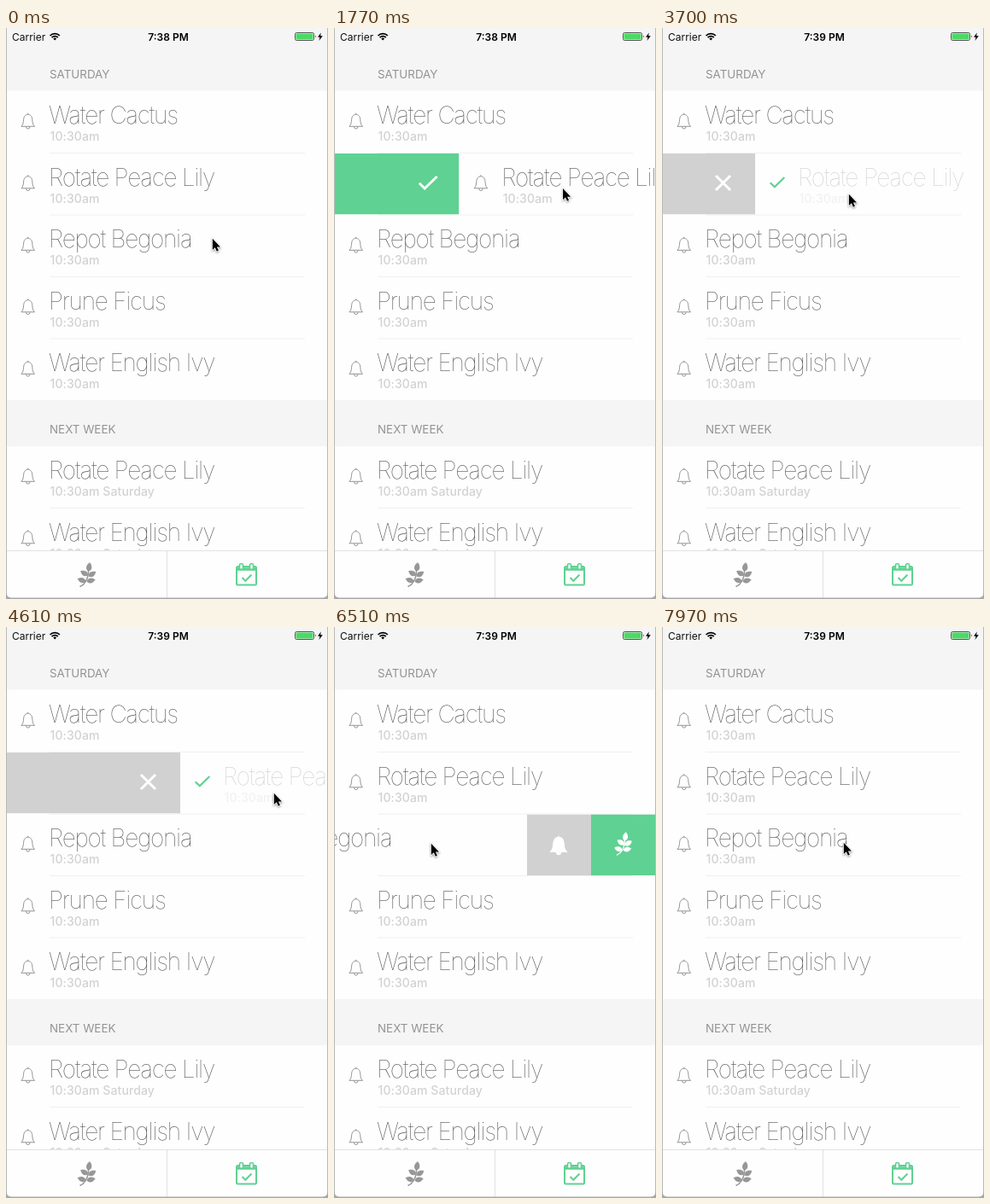
Write an HTML page that moves like this. It is 377 px wide and 669 px high and loops after 7990 ms.

```html
<!DOCTYPE html>
<html lang="en">
<head>
<meta charset="utf-8">
<title>Plant care reminders</title>
<style>
  html, body { margin: 0; width: 100%; height: 100%; overflow: hidden; background: #fefefe; }
  svg { display: block; width: 100%; height: 100%; }
  text { font-family: Inter, Roboto, sans-serif; font-optical-sizing: none; }
  .title { font-size: 28px; font-weight: 100; letter-spacing: -1.25px; fill: #555; }
  .time { font-size: 14px; font-weight: 500; letter-spacing: .1px; fill: #d2d2d2; }
  .section { font-size: 13.4px; fill: #939396; }
  .status { font-size: 12px; fill: #111; }
  .clock { font-weight: 600; text-anchor: middle; fill: #000; }
  .line { fill: none; }
</style>
</head>
<body>
<svg viewBox="0 0 377 669">
  <defs>
    <g id="bell">
      <path d="M-7.8 6C-5.4 4-5.4 1-5.1-2C-4.8-6-2.6-8-0-8S4.8-6 5.1-2C5.4 1 5.4 4 7.8 6Z"/>
      <path d="M-2.2 6.4a2.2 2.4 0 0 0 4.4 0M0-8V-9.6"/>
    </g>
    <path id="check" d="M-8.3 .2L-3.2 5.2L8.3-6"/>
    <path id="leaf" d="M0 0C-5-3-5-8 0-13C5-8 5-3 0 0Z"/>
    <g id="plant">
      <path d="M-8 14C-3 12 2 6 2-5" fill="none" stroke="currentColor" stroke-width="1.5"/>
      <g fill="currentColor">
        <use href="#leaf" transform="translate(2 -3.5) rotate(8) scale(.85)"/>
        <use href="#leaf" transform="translate(1.5 1) rotate(-58) scale(.8)"/>
        <use href="#leaf" transform="translate(2 2) rotate(58) scale(.8)"/>
        <use href="#leaf" transform="translate(-1 8) rotate(-72) scale(.8)"/>
        <use href="#leaf" transform="translate(0 8) rotate(78) scale(.8)"/>
      </g>
    </g>
    <rect id="ring" x="-2" y="-3.2" width="4" height="6.4" rx="1.4"/>
    <clipPath id="rowClip"><rect width="377" height="71.5" y=".5"/></clipPath>
  </defs>

  <rect width="377" height="669" fill="#fefefe"/>
  <rect width="377" height="73.5" fill="#f5f5f5"/>
  <rect y="436" width="377" height="54" fill="#f5f5f5"/>
  <text class="section" x="51" y="58.5">SATURDAY</text>
  <text class="section" x="51" y="474.5">NEXT WEEK</text>

  <text class="status" x="7" y="14.5">Carrier</text>
  <g class="line" stroke="#000" stroke-width="1.7">
    <path d="M51.5 9a8 8 0 0 1 11.4 0M53.6 11.2a5 5 0 0 1 7.2 0"/>
    <path d="M57.2 14.5l-1.9-2a2.7 2.7 0 0 1 3.8 0Z" fill="#000" stroke="none"/>
  </g>
  <text class="status clock" id="clock" x="190" y="14.5"></text>
  <rect x="338.5" y="5.5" width="22" height="9" rx="1.8" fill="none" stroke="#555"/>
  <rect x="339.5" y="6.5" width="20" height="7" rx=".8" fill="#4cd964"/>
  <path d="M362 8.2q1.6 1.8 0 3.6Z" fill="#333"/>
  <path d="M368.8 5.5L365 10.7h2.6L366.4 15l4.4-5.7h-2.7Z"/>

  <g id="rows"></g>

  <rect y="612" width="377" height="57" fill="#fefefe"/>
  <path d="M0 612.5H377M188.5 613V668" class="line" stroke="#e2e2e2"/>
  <use href="#plant" x="94.5" y="640.5" color="#979797"/>
  <g class="line" stroke="#5fd192" stroke-width="2">
    <rect x="270" y="631" width="23" height="21.5" rx="1.5"/>
    <path d="M270 634H293" stroke-width="3.5"/>
    <g fill="#fefefe" stroke-width="1.6">
      <use href="#ring" x="275.5" y="631"/>
      <use href="#ring" x="287.5" y="631"/>
    </g>
    <path d="M276.5 644L280.3 647.8L287.5 640.5"/>
  </g>
  <path d="M.5 0V669M376.5 0V669" class="line" stroke="#b9b9b9"/>
  <path d="M0 661V669H377V661Q376 667.5 371 667.5H6Q1 667.5 0 661Z" fill="#a8a8a8"/>

  <path id="cursor" d="M.8 .8V14L3.8 11.3L5.8 15.7L7.9 14.8L5.9 10.5H10Z" stroke="#fff" stroke-width="1.6"
    paint-order="stroke" style="filter:drop-shadow(0 1px 1px #0006)"/>
</svg>

<script>
const LOOP = 7990, RIGHT = 376, ROW = 72.5, BUTTON = 75;
const GREEN = '#5fd192', GREY = '#d1d1d1';
const $ = id => document.getElementById(id);

const saturday = ['Water Cactus', 'Rotate Peace Lily', 'Repot Begonia', 'Prune Ficus', 'Water English Ivy'];
const nextWeek = ['Rotate Peace Lily', 'Water English Ivy'];

// Buttons ride at the edges of the sliding content.
const leftButton = `
  <rect id="leftFill" x="-400" y=".5" width="400" height="71.5"/>
  <g class="line" stroke="#fff" stroke-width="3">
    <use id="leftCheck" href="#check" transform="translate(-36 35) scale(1.25)" stroke-width="2.4"/>
    <path id="leftCross" d="M-46 26.5L-29 43.5M-29 26.5L-46 43.5"/>
  </g>`;
const rightButtons = `
  <rect x="${RIGHT}" y=".5" width="400" height="71.5" fill="${GREY}"/>
  <use href="#bell" transform="translate(${RIGHT + 37} 37) scale(1.2)" fill="#fff" stroke="#fff"/>
  <g id="plantButton">
    <rect y=".5" width="400" height="71.5" fill="${GREEN}"/>
    <use href="#plant" transform="translate(37.5 35) scale(.95)" color="#fff"/>
  </g>`;

function rowMarkup(title, i, id, top, time, last) {
  const extra = id === 'day1' ? leftButton : id === 'day2' ? rightButtons : '';
  return `<g transform="translate(0 ${top + i * ROW})">
    ${last ? '' : '<path d="M51 72.5H350" stroke="#f0f0f0"/>'}
    <g clip-path="url(#rowClip)"><g id="${id}">
      <use class="icon" href="#bell" x="25.7" y="35.3" fill="none" stroke="#888" stroke-width=".9"/>
      <use class="done" href="#check" x="26" y="34.5" fill="none" stroke="${GREEN}" stroke-width="2.2"/>
      <g class="label">
        <text class="title" x="50" y="38">${title}</text>
        <text class="time" x="51.5" y="58">${time}</text>
      </g>${extra}
    </g></g>
  </g>`;
}

$('rows').innerHTML =
  saturday.map((s, i) => rowMarkup(s, i, 'day' + i, 74, '10:30am', i === 4)).join('') +
  nextWeek.map((s, i) => rowMarkup(s, i, 'week' + i, 490, '10:30am Saturday')).join('');

const progress = (t, start, end) => Math.min(1, Math.max(0, (t - start) / (end - start)));
const ease = (t, start, end) => {
  const u = progress(t, start, end);
  return u * u * (3 - 2 * u);
};
// A hand-led drag: almost even speed, slowing slightly.
const drag = (t, start, end) => {
  const u = progress(t, start, end);
  return u * (1.2 - .2 * u);
};

const finishPull = t => 185 * drag(t, 1225, 1950);
const undoPull = t => 204 * drag(t, 3260, 4170);
const lilyShift = t => finishPull(t) * (1 - ease(t, 1980, 2300)) + undoPull(t) * (1 - ease(t, 4610, 4930));
const begoniaShift = t => -2 * BUTTON * (ease(t, 5690, 6160) - ease(t, 6690, 7650));
const completed = t => ease(t, 2230, 2600) - ease(t, 4800, 5150);

function pointer(t) {
  let x = 241, y = 246;
  const glide = (start, end, toX, toY) => {
    const k = ease(t, start, end);
    x += (toX - x) * k;
    y += (toY - y) * k;
  };
  glide(450, 830, 59, 177);
  glide(830, 1030, 121, 184);
  x += finishPull(t);
  y += 4 * drag(t, 1225, 1950);
  glide(2500, 2770, 58, 194);
  glide(2800, 3060, 109, 194);
  x += undoPull(t);
  glide(4700, 5290, 236, 257);
  glide(5410, 5690, 222, 253);
  glide(5690, 6160, 103, 253);
  glide(6360, 6510, 113, 253);
  glide(6680, 7450, 212, 252);
  return [x, y];
}

const move = (id, x, y = 0) => $(id).setAttribute('transform', `translate(${x} ${y})`);
const fade = (el, opacity) => el.setAttribute('opacity', opacity);
const lily = selector => $('day1').querySelector(selector);
document.querySelectorAll('.done').forEach(el => fade(el, 0));

function draw(t) {
  const done = completed(t), undoing = t > 2800, slide = begoniaShift(t);
  move('cursor', ...pointer(t));
  move('day1', lilyShift(t));
  move('day2', slide);
  move('plantButton', RIGHT - slide / 2);
  fade(lily('.label'), 1 - .72 * done);
  fade(lily('.icon'), done > .5 ? 0 : 1);
  fade(lily('.done'), done > .5 ? 1 : 0);
  $('leftFill').setAttribute('fill', undoing ? GREY : GREEN);
  fade($('leftCheck'), undoing ? 0 : 1);
  fade($('leftCross'), undoing ? 1 : 0);
  $('clock').textContent = t < 3500 ? '7:38 PM' : '7:39 PM';
}

function frame() {
  draw(performance.now() % LOOP);
  requestAnimationFrame(frame);
}
frame();
</script>
</body>
</html>
```
